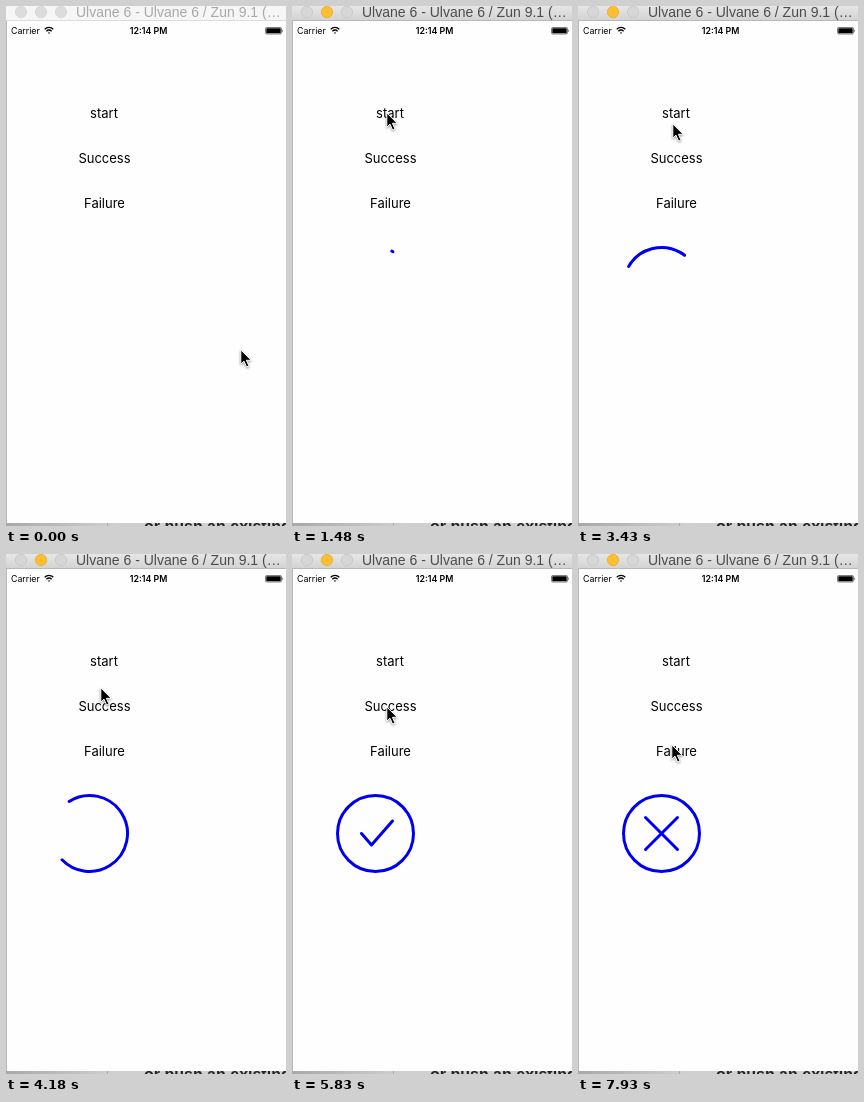
These frames come from a looping animation (280 px wide and 520 px high, 8000 ms). An HTML page:

```html
<!DOCTYPE html>
<html lang="en">
<head>
<meta charset="utf-8">
<style>
  html, body { margin: 0; width: 100%; height: 100%; overflow: hidden; background: #fff; }
  svg { display: block; width: 280px; height: 520px; }
  .ui { font: 13px Inter, "Open Sans", sans-serif; text-anchor: middle; }
  .status { font: 8.8px Inter, "Open Sans", sans-serif; }
  .clock { font-weight: 600; text-anchor: middle; }
  .title { font: 14px "Liberation Sans", Arial, sans-serif; fill: #a9a9a9; }
  .bar { fill: #f6f6f6; }
  .edge { stroke: #dcdcdc; }
  .light { fill: #dcdcdc; stroke: #cfcfcf; stroke-width: .6; }
  .active .title { fill: #4c4c4c; }
  .active .bar { fill: url(#chrome); }
  .active .edge { stroke: #b8b8b8; }
  .active .light { fill: #d6d6d6; stroke: #c2c2c2; }
  .active .minimise { fill: #fdbe30; stroke: #e0a028; }
  .ink { fill: none; stroke: #0000f0; stroke-width: 3; stroke-linecap: round; stroke-linejoin: round; }
  #cursor { stroke: #fff; filter: drop-shadow(0 1px 1px #0006); }
</style>
</head>
<body>
<svg id="stage" viewBox="0 0 280 520">
  <defs>
    <linearGradient id="chrome" x2="0" y2="1">
      <stop stop-color="#e6e6e6"/><stop offset="1" stop-color="#d2d2d2"/>
    </linearGradient>
    <linearGradient id="shadow">
      <stop stop-color="#a8a8a8"/><stop offset=".4" stop-color="#d0d0d0"/>
    </linearGradient>
  </defs>

  <!-- page behind the window -->
  <rect y="516" width="280" height="4" fill="url(#shadow)"/>
  <path d="M101.5 516v4" stroke="#aaa"/>
  <text x="138" y="525.5" font-family="Liberation Sans, Arial, sans-serif" font-size="16" font-weight="bold" fill="#222">or push an existing</text>

  <!-- window -->
  <rect width="280" height="517" fill="#fefefe"/>
  <path d="M.5 15V517" stroke="#b8b8b8"/>
  <rect class="bar" width="280" height="15"/>
  <path class="edge" d="M0 14.5H280"/>
  <circle class="light" cx="15" cy="6" r="5.7"/>
  <circle class="light minimise" cx="35" cy="6" r="5.7"/>
  <circle class="light" cx="55" cy="6" r="5.7"/>
  <text class="title" x="70" y="11">Ulvane 6 - Ulvane 6 / Zun 9.1 (…</text>

  <!-- status bar -->
  <text class="status" x="5" y="28">Carrier</text>
  <g fill="none" stroke="#000" stroke-width="1.3">
    <path d="M38.7 23.2a6.2 6.2 0 0 1 8.6 0M40.4 25.2a3.8 3.8 0 0 1 5.2 0"/>
    <path d="M41.8 26.4h2.4L43 28z" fill="#000" stroke="none"/>
  </g>
  <text class="status clock" x="142.5" y="28">12:14 PM</text>
  <rect x="259.5" y="21.5" width="16" height="6.5" rx="1.3" fill="none" stroke="#000" stroke-width=".5"/>
  <rect x="260.3" y="22.2" width="14.4" height="5.1" rx=".6"/>
  <path d="M276.5 23.3q1.3 1.5 0 3z"/>

  <g class="ui">
    <text x="98" y="112">start</text>
    <text x="98.5" y="157">Success</text>
    <text x="98.5" y="202">Failure</text>
  </g>

  <circle id="ring" class="ink" cx="83.5" cy="279.5" r="38" pathLength="360"/>
  <path id="check" class="ink" pathLength="100" d="M69.5 279.5L79.5 291L100.5 267"/>
  <path id="cross1" class="ink" pathLength="100" d="M67.5 263.5l32 32"/>
  <path id="cross2" class="ink" pathLength="100" d="M99.5 263.5l-32 32"/>

  <path id="cursor" d="M.8.9V15.2L4 12.2L6.6 18.1L9 17L6.4 11.3H11.2Z"/>
</svg>
<script>
const LOOP = 8000, STEP = 150;
const LOADING = 1408, SUCCESS = 5060, FAILURE = 7050, RESULT_TIME = 750;
const CYCLE = 1539, GROW = 1169, HEAD = 0.235, SPIN = -0.0587;

// time, x, y of the pointer; it jumps from place to place
const pointer = [
  [0, 234, 343], [150, 200, 292], [300, 162, 241], [590, 138, 194], [740, 108, 132],
  [880, 94, 106], [3130, 94, 117], [4180, 94, 133], [4330, 94, 152],
  [6430, 93, 166], [6580, 93, 186], [6730, 93, 197], [7630, 93, 190]
];
const [stage, ring, check, cross1, cross2, cursor] =
  ['stage', 'ring', 'check', 'cross1', 'cross2', 'cursor'].map(id => document.getElementById(id));

// CSS-style cubic Bezier easing with control points (x1, 0) and (x2, 1)
function ease(x, x1, x2) {
  if (x <= 0) return 0;
  if (x >= 1) return 1;
  let lo = 0, hi = 1, s;
  for (let i = 0; i < 24; i++) {
    s = (lo + hi) / 2;
    const at = 3 * (1 - s) ** 2 * s * x1 + 3 * (1 - s) * s * s * x2 + s ** 3;
    if (at < x) lo = s; else hi = s;
  }
  return s * s * (3 - 2 * s);
}
const easeInOut = x => ease(x, 0.42, 0.58);
const easeIn = x => ease(x, 0.42, 1);

function stroke(shape, length, total) {
  shape.style.display = length > 0 ? '' : 'none';
  shape.setAttribute('stroke-dasharray', length >= total ? 'none' : `${Math.max(length, 0.1)} ${total * 2}`);
}

function drawRing(angle, length) {
  ring.setAttribute('transform', `rotate(${angle} 83.5 279.5)`);
  stroke(ring, length, 360);
}

function drawLoader(time) {
  const t = time % CYCLE;
  const grown = easeInOut(t / GROW);
  const shrunk = easeInOut((t - GROW) / (CYCLE - GROW));
  const start = HEAD * grown + (1 - HEAD) * shrunk;
  drawRing(-61 + SPIN * time + 360 * start, 360 * (grown - start));
}

function render(t) {
  // the screen refreshes every STEP ms
  const shown = 1480 + STEP * Math.floor((t - 1480) / STEP);
  stage.classList.toggle('active', t >= 1480);

  const [, x, y] = pointer.findLast(p => p[0] <= t);
  cursor.setAttribute('transform', `translate(${x} ${y})`);

  const failed = shown >= FAILURE, succeeded = shown >= SUCCESS && !failed;
  const done = easeIn((shown - (failed ? FAILURE : SUCCESS)) / RESULT_TIME);
  stroke(check, succeeded ? 100 * done : 0, 100);
  // the second bar of the cross follows the first
  stroke(cross1, failed ? 200 * done : 0, 100);
  stroke(cross2, failed ? 200 * done - 100 : 0, 100);
  if (failed || succeeded) drawRing(-90, 360 * done);
  else if (shown >= LOADING) drawLoader(shown - LOADING);
  else drawRing(0, 0);
}

const began = performance.now();
function tick() {
  render((performance.now() - began) % LOOP);
  requestAnimationFrame(tick);
}
tick();
</script>
</body>
</html>
```
